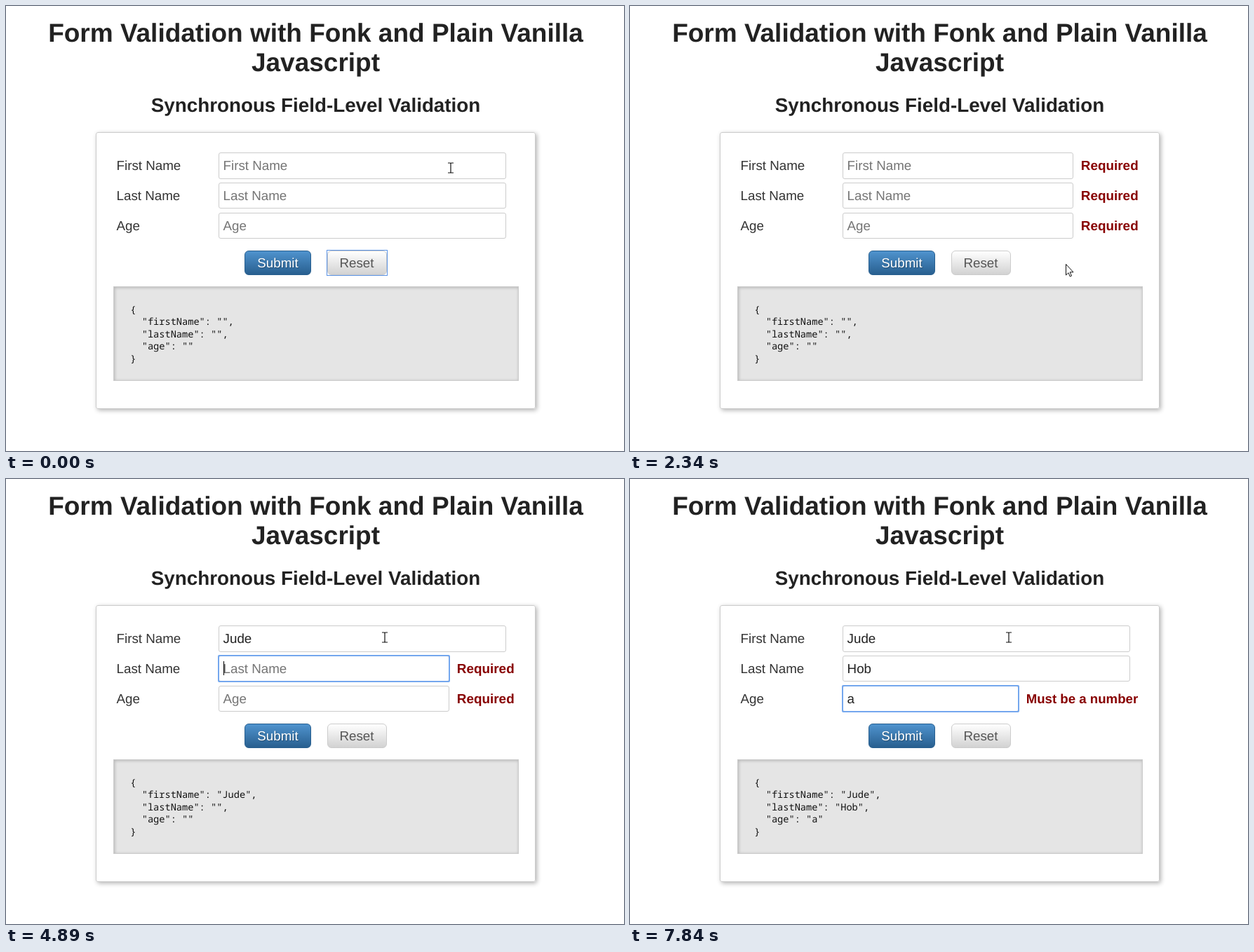
An HTML page for the animation above (8 s loop, 881 by 635 pixels).

```html
<!DOCTYPE html>
<html lang="en">
<head>
<meta charset="utf-8">
<title>Form Validation</title>
<style>
  html, body { margin: 0; width: 100%; height: 100%; overflow: hidden; background: #fff; }
  #stage { position: absolute; left: 0; top: 0; width: 881px; height: 635px; overflow: hidden; }
  #stage div { position: absolute; box-sizing: border-box; }
  .card { left: 128px; top: 180px; width: 627px; height: 395px; border: 1px solid #ccc; border-radius: 3px;
    box-shadow: 2px 2px 6px rgba(0, 0, 0, .3); }
  .field { left: 303px; width: 410px; height: 37px; border: 1px solid #ccc; border-radius: 3px; }
  .button { top: 349px; height: 35px; border-radius: 6px; }
  .submit { left: 340px; width: 95px; border: 1px solid #285f8f; background: linear-gradient(#4f93ce, #285f8f); }
  .reset { left: 458px; width: 85px; border: 1px solid #ccc; background: linear-gradient(#fff, #d2d2d2); }
  .output { left: 153px; top: 400px; width: 578px; height: 135px; border: 1px solid #ccc; background: #e5e5e5;
    box-shadow: inset 1px 1px 4px rgba(0, 0, 0, .22); }
  .ring { left: 302px; border: 2px solid #74a7ee; border-radius: 2px; }
  .ring.thin { border: 1px solid #5a92e4; border-radius: 0; }
  svg { position: absolute; left: 0; top: 0; }
  text { font: 18.75px "Liberation Sans", Arial, sans-serif; fill: #222; text-rendering: geometricPrecision; white-space: pre; }
  .title { font-size: 37px; font-weight: bold; text-anchor: middle; }
  .sub { font-size: 27.8px; font-weight: bold; text-anchor: middle; }
  .label { fill: #333; }
  .hint { fill: #757575; }
  .error { font-weight: bold; fill: #800; }
  .code { font: 13.67px "Noto Sans Mono", "DejaVu Sans Mono", monospace; fill: #111; }
  .center { text-anchor: middle; }
</style>
</head>
<body>
<div id="stage">
  <div class="card"></div>
  <div class="output"></div>
  <div class="button submit"></div>
  <div class="button reset"></div>
  <div class="field" style="top:209px;height:38px"></div>
  <div class="field" style="top:252px"></div>
  <div class="field" style="top:295px"></div>
  <div class="ring" id="ring"></div>
  <svg id="art" width="881" height="635">
    <text class="title" x="441.5" y="51">Form Validation with Fonk and Plain Vanilla</text>
    <text class="title" x="441.5" y="92.5">Javascript</text>
    <text class="sub" x="441.5" y="150.5">Synchronous Field-Level Validation</text>
    <text class="center" x="387.5" y="373" style="fill:#fff;text-shadow:1px 1px 1px rgba(0,0,0,.3)">Submit</text>
    <text class="center" x="500" y="373" style="fill:#555">Reset</text>
    <rect id="caret" width="1" height="20" fill="#000"/>
    <path id="beam" d="M-4 -7H-1Q0 -7 0 -6Q0 -7 1 -7H4M0 -6.5V6.5M-4 7H-1Q0 7 0 6Q0 7 1 7H4" fill="none" stroke="#111" stroke-width="1.2"/>
    <path id="arrow" d="M.5 .5V16L4 12.7L6.3 18L8.5 17L6.2 11.8H11Z" fill="#fff" stroke="#111"/>
  </svg>
</div>
<script>
const LOOP = 8000, BLINK = 530, TEXT_X = 309.6, RESET = 3;
const $ = id => document.getElementById(id);
const art = $('art'), ring = $('ring'), caret = $('caret'), beam = $('beam'), arrow = $('arrow');
const boxes = [...document.querySelectorAll('.field')];

function addText(cls, x, y, str = '') {
  const el = document.createElementNS('http://www.w3.org/2000/svg', 'text');
  el.setAttribute('class', cls);
  el.setAttribute('x', x);
  el.setAttribute('y', y);
  el.textContent = str;
  return art.insertBefore(el, caret);
}

const fields = [
  { key: 'firstName', hint: 'First Name', base: 234, top: 209, ring: [209, 38], text: 'Jude', keys: [3810, 4040, 4340, 4570], bad: 1290 },
  { key: 'lastName', hint: 'Last Name', base: 277, top: 252, ring: [251, 39], text: 'Hob', keys: [5590, 5900, 6130], bad: 1850 },
  { key: 'age', hint: 'Age', base: 320, top: 295, ring: [294, 39], text: 'a', keys: [7310], bad: 2340, wrong: 'Must be a number' }
];
fields.forEach((f, i) => {
  addText('label', 157.6, f.base, f.hint);
  f.input = addText('', TEXT_X, f.base);
  f.error = addText('error', 0, f.base);
  f.code = addText('code', 177.3, [455, 472.5, 490][i]);
});
addText('code', 177.3, 437.5, '{');
addText('code', 177.3, 507.5, '}');

const focusLog = [[0, RESET], [530, 0], [1290, 1], [1850, 2], [2340, -1], [3030, 0], [4890, 1], [6590, 2]];

// Pointer moves: first step, last step, step count, from, to
const moves = [
  [760, 1220, 7, [634, 231], [633, 270]],
  [1460, 1700, 4, [633, 270], [629, 314]],
  [2020, 2170, 3, [629, 314], [621, 368]],
  [2490, 2870, 6, [621, 368], [540, 226]]
];

function pointer(t) {
  let pos = moves[0][3];
  for (const [start, end, n, from, to] of moves) {
    if (t < start) break;
    const step = Math.min(n, 1 + Math.floor((t - start) / (end - start) * (n - 1) + 1e-6));
    const u = step / n, e = u * u * (3 - 2 * u);
    pos = from.map((v, i) => Math.round(v + (to[i] - v) * e));
  }
  return pos;
}

function show(el, on) { el.style.display = on ? '' : 'none'; }

function drawField(f, i, t) {
  const count = f.keys.filter(k => k <= t).length;
  const value = f.text.slice(0, count);
  const error = count ? f.wrong || '' : t >= f.bad ? 'Required' : '';
  f.right = !error ? 713 : error === f.wrong ? 554 : 632;
  boxes[i].style.width = f.right - 303 + 'px';
  f.input.textContent = value || f.hint;
  f.input.setAttribute('class', value ? '' : 'hint');
  f.error.textContent = error;
  f.error.setAttribute('x', error === f.wrong ? 564.7 : 642.8);
  f.error.style.fontSize = error === f.wrong ? '18.65px' : '18.9px';
  f.code.textContent = `  "${f.key}": "${value}"${i < 2 ? ',' : ''}`;
  f.caretX = Math.round(TEXT_X + (value ? f.input.getComputedTextLength() : 0));
  f.lastKey = count ? f.keys[count - 1] : 0;
}

function placeRing(x, y, w, h) {
  Object.assign(ring.style, { left: x + 'px', top: y + 'px', width: w + 'px', height: h + 'px' });
}

function draw(t) {
  fields.forEach((f, i) => drawField(f, i, t));

  const [since, focus] = focusLog.filter(e => e[0] <= t).pop();
  const f = fields[focus];
  show(ring, focus >= 0);
  ring.classList.toggle('thin', focus === RESET);
  if (focus === RESET) placeRing(457, 348, 87, 37);
  if (f) {
    placeRing(302, f.ring[0], f.right - 301, f.ring[1]);
    caret.setAttribute('x', f.caretX);
    caret.setAttribute('y', f.top + (focus ? 8 + (focus > 1) : 9));
  }
  const idle = t - Math.max(since, f ? f.lastKey : 0);
  show(caret, f && Math.floor(idle / BLINK) % 2 === 0);

  const [x, y] = pointer(t);
  const over = fields.some(g => y >= g.top && y < g.top + 37 && x < g.right);
  show(beam, over);
  show(arrow, !over);
  (over ? beam : arrow).setAttribute('transform', `translate(${x} ${y})`);
}

const origin = performance.now();
function tick() {
  draw((performance.now() - origin) % LOOP);
  requestAnimationFrame(tick);
}
tick();
</script>
</body>
</html>
```
